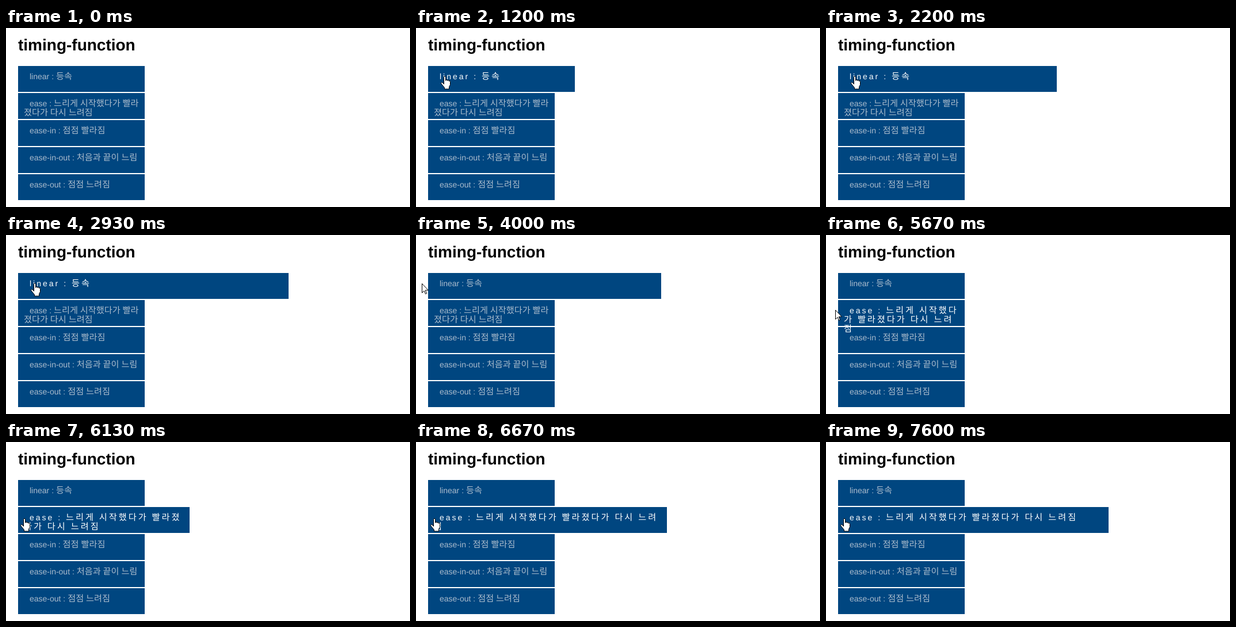
An HTML page for the animation above (8 s loop, 702x311 px).

```html
<!DOCTYPE html>
<html lang="ko">
<head>
<meta charset="utf-8">
<title>timing-function</title>
<style>
html, body { margin: 0; width: 100%; height: 100%; overflow: hidden; background: #fff; }
body {
  box-sizing: border-box; padding: 14px 0 0 21px;
  font: 14px/16px Arial, "Liberation Sans", sans-serif;
  text-rendering: geometricPrecision;
}
h1 { margin: 0; height: 52px; font-size: 28px; line-height: normal; color: #000; }
p {
  box-sizing: border-box; width: 220px; height: 45px; margin: 0 0 2px;
  padding: 10px 9px 0 10px; text-indent: 10px; background: #004680; color: #abc;
}
p.hover { color: #fff; letter-spacing: 3px; }
p span { font: 15.2px/0 "Noto Sans CJK KR", "Noto Sans CJK", sans-serif; }
svg { position: absolute; left: 0; top: 0; }
path { fill: #fff; stroke: #000; }
</style>
</head>
<body>
<h1>timing-function</h1>
<p>linear : 등속</p>
<p>ease : 느리게 시작했다가 빨라졌다가 다시 느려짐</p>
<p>ease-in : 점점 빨라짐</p>
<p>ease-in-out : 처음과 끝이 느림</p>
<p>ease-out : 점점 느려짐</p>
<svg width="702" height="311">
  <g id="cursor">
    <path id="arrow" d="M.5.5V16.5L4 13l2.6 5.5 2-1L6.2 12h5.2Z"/>
    <path id="hand" transform="translate(-6 -.5)" d="M5.5 14V2Q5.5.5 7 .5T8.5 2V8Q8.5 6.5 10 6.5T11.5 8Q11.5 7.2 13 7.2T14.5 9Q14.5 8.3 15.7 8.5T16.5 10V15L14.5 19V22.5H6.5V20L1 13.5Q0 11.5 1.5 11T5.5 14Z"/>
  </g>
</svg>
<script>
const LOOP = 8000, DURATION = 2000;
const bars = document.querySelectorAll('p');
const [cursor, arrow, hand] = ['cursor', 'arrow', 'hand'].map(id => document.getElementById(id));

for (const bar of bars) bar.innerHTML = bar.textContent.replace(/[가-힣]+/g, '<span>$&</span>');

// Pointer stops: time, x, y
const stops = [
  [670, 0, 2], [870, 49, 84], [3460, 49, 84], [3480, 14, 84], [3600, 10, 84],
  [4280, 10, 84], [4400, 8, 84], [5190, 8, 84], [5400, 6, 100], [5670, 16, 130],
  [5730, 31, 133], [LOOP, 31, 133]
];

const progress = (t, start) => Math.min(1, Math.max(0, (t - start) / DURATION));
const bezier = (a, b, s) => 3 * a * s * (1 - s) ** 2 + 3 * b * s * s * (1 - s) + s ** 3;

// cubic-bezier(.25, .1, .25, 1)
function ease(x) {
  let lo = 0, hi = 1;
  for (let i = 0; i < 30; i++) {
    const mid = (lo + hi) / 2;
    if (bezier(.25, .25, mid) < x) lo = mid; else hi = mid;
  }
  return bezier(.1, 1, hi);
}

function setBar(bar, amount, hover) {
  bar.style.width = Math.round(220 + 250 * amount) + 'px';
  bar.className = hover ? 'hover' : '';
}

function pointer(t) {
  const i = stops.findIndex(s => s[0] > t);
  const [t0, x0, y0] = stops[i - 1], [t1, x1, y1] = stops[i];
  const k = (t - t0) / (t1 - t0);
  return [x0 + (x1 - x0) * k, y0 + (y1 - y0) * k].map(Math.round);
}

const show = (el, on) => el.style.display = on ? '' : 'none';

function draw(now) {
  const t = now % LOOP;
  setBar(bars[0], progress(t, 920) - progress(t, 3480), t >= 870 && t < 3470);
  setBar(bars[1], ease(progress(t, 5718)), t >= 5660);

  const pointing = t >= 870 && t < 3470 || t >= 5710;
  show(cursor, t >= 670);
  show(hand, pointing);
  show(arrow, !pointing);
  if (t >= 670) cursor.setAttribute('transform', `translate(${pointer(t)})`);
}

const start = performance.now();
function tick() {
  draw(performance.now() - start);
  requestAnimationFrame(tick);
}
tick();
</script>
</body>
</html>
```
